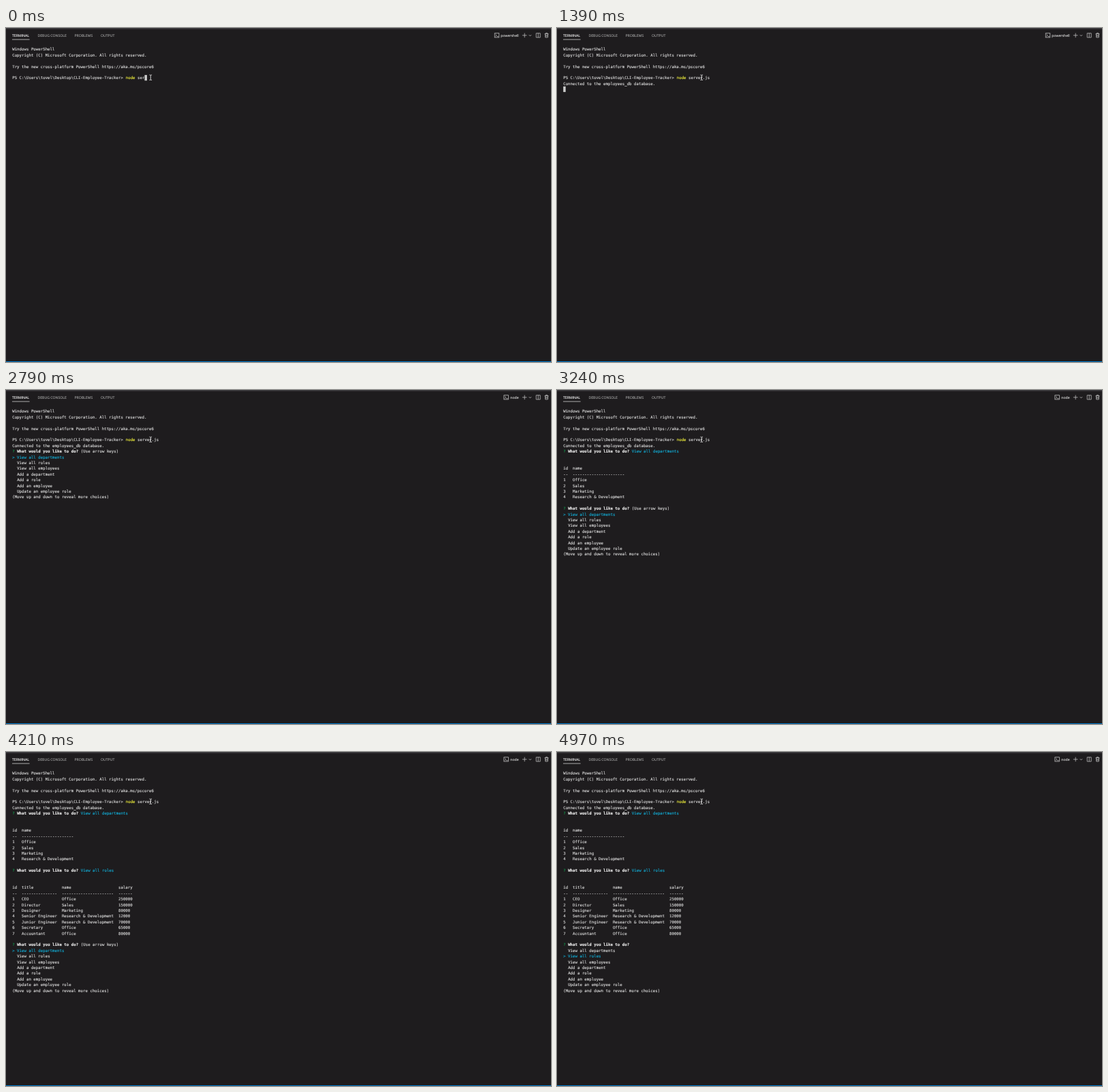
Animation of 800 by 491 pixels, one loop 5 s. Source, as an HTML page:

```html
<!DOCTYPE html>
<html lang="en">
<head>
<meta charset="utf-8">
<title>Employee tracker terminal</title>
<style>
  html, body { margin: 0; width: 100%; height: 100%; overflow: hidden; background: #1e1c1e; }
  svg { display: block; width: 100%; height: 100%; }
  text { white-space: pre; text-rendering: geometricPrecision; fill: var(--ink); stroke: var(--ink); stroke-width: .12; }
  #tabs, #shell { font: 5.2px "Open Sans", "Noto Sans", sans-serif; --ink: #a0a0a0; }
  #tabs .active { --ink: #f4f4f4; }
  #shell { --ink: #dcdcdc; }
  .icon { fill: none; stroke: #d0d0d0; stroke-width: .7; }
  #screen { font: 5.762px "DejaVu Sans Mono", "Noto Sans Mono", monospace; --ink: #dedede; }
  #screen .bold { font-weight: 700; --ink: #f2f2f2; }
  #screen .command { --ink: #f8f83c; }
  #screen .mark { --ink: #119a4c; }
  #screen .pick { --ink: #12b0da; }
</style>
</head>
<body>
<svg viewBox="0 0 800 491" preserveAspectRatio="none">
  <rect width="800" height="491" fill="#1e1c1e"/>
  <rect width="800" height="1.7" fill="#3b3a3d"/>
  <rect y="490" width="800" height="1" fill="#007acc"/>
  <g id="tabs">
    <text class="active" x="9" y="12.9">TERMINAL</text>
    <text x="46.4" y="12.9">DEBUG CONSOLE</text>
    <text x="100.4" y="12.9">PROBLEMS</text>
    <text x="138.9" y="12.9">OUTPUT</text>
    <rect x="9" y="16.6" width="25.6" height=".7" fill="#e7e7e7"/>
  </g>
  <g id="shell">
    <g id="shellIcon" class="icon">
      <rect x=".4" y="7.7" width="6.6" height="6.2"/>
      <path d="M1.7 9.2l1.8 1.6-1.8 1.6M3.9 12.5h2"/>
    </g>
    <text id="shellName" x="752.7" y="12.6" text-anchor="end"></text>
  </g>
  <path class="icon" d="M757.9 10.8h6.6M761.2 7.5v6.6M767.6 10l1.8 1.8 1.8-1.8"/>
  <path class="icon" d="M778.2 7.7h6v6.2h-6zM781.2 7.7v6.2"/>
  <path class="icon" d="M790.6 8.6h5.8M792.3 8.6v-1.2h2.4v1.2M791.4 8.6l.3 5.3h3.6l.3-5.3M792.8 9.9v2.8M794.2 9.9v2.8"/>
  <g id="screen"></g>
  <path d="M210.5 69h1.3l.5.5.5-.5h1.3M212.3 69.5v6.5M210.5 76.5h1.3l.5-.5.5.5h1.3" fill="none" stroke="#e4e4e4" stroke-width=".9"/>
</svg>
<script>
const LOOP = 5000, LEFT = 9.2, TOP = 33.3, CHAR = 3.469, LINE = 8.4;
const $ = id => document.getElementById(id);

const PROMPT = 'PS C:\\Users\\tovel\\Desktop\\CLI-Employee-Tracker>';
const QUESTION = 'What would you like to do?';
const CHOICES = ['View all departments', 'View all roles', 'View all employees',
  'Add a department', 'Add a role', 'Add an employee', 'Update an employee role'];
const DEPARTMENTS = ['Office', 'Sales', 'Marketing', 'Research & Development'];
const ROLES = [['CEO', 0, 250000], ['Director', 1, 150000], ['Designer', 2, 80000],
  ['Senior Engineer', 3, 12000], ['Junior Engineer', 3, 70000],
  ['Secretary', 0, 65000], ['Accountant', 0, 80000]];

// Moments at which each letter after "ser" is typed.
const KEYS = [90, 210, 300, 480, 620, 740];
const AT = { enter: 990, connected: 1210, menu: 1480, renamed: 2270,
  departments: 3090, down: 3650, roles: 4210, downAgain: 4820 };

const escape = s => s.replace(/&/g, '&amp;').replace(/</g, '&lt;').replace(/>/g, '&gt;');
const put = (row, col, text, style = '') =>
  `<text class="${style}" x="${LEFT + col * CHAR}" y="${TOP + row * LINE}">${escape(text)}</text>`;
const cursor = (row, col) =>
  `<rect x="${LEFT + col * CHAR}" y="${TOP + row * LINE - 6.2}" width="3.5" height="8.2" fill="#cccccc"/>`;

const ask = row => put(row, 0, '?', 'mark') + put(row, 2, QUESTION, 'bold');
const answer = (row, choice) => ask(row) + put(row, 29, CHOICES[choice], 'pick');

function menu(row, selected) {
  const items = CHOICES.map((choice, i) => i === selected
    ? put(row + 1 + i, 0, '> ' + choice, 'pick')
    : put(row + 1 + i, 2, choice));
  return ask(row) + (selected ? '' : put(row, 29, '(Use arrow keys)')) + items.join('')
    + put(row + 8, 0, '(Move up and down to reveal more choices)');
}

function table(row, heads, records) {
  const lines = [heads, ...records].map(cells => cells.map(String));
  const widths = heads.map((_, i) => Math.max(...lines.map(cells => cells[i].length)));
  lines.splice(1, 0, widths.map(width => '-'.repeat(width)));
  return lines.map((cells, i) =>
    put(row + i, 0, cells.map((cell, j) => cell.padEnd(widths[j])).join('  ').trimEnd())).join('');
}

const departmentTable = () =>
  table(10, ['id', 'name'], DEPARTMENTS.map((name, i) => [i + 1, name]));
const roleTable = () => table(20, ['id', 'title', 'name', 'salary'],
  ROLES.map(([title, dept, salary], i) => [i + 1, title, DEPARTMENTS[dept], salary]));

function screen(t) {
  const typed = 'server.js'.slice(0, 3 + KEYS.filter(key => t >= key).length);
  let out = put(0, 0, 'Windows PowerShell')
    + put(1, 0, 'Copyright (C) Microsoft Corporation. All rights reserved.')
    + put(3, 0, 'Try the new cross-platform PowerShell https://aka.ms/pscore6')
    + put(5, 0, PROMPT) + put(5, 48, 'node', 'command') + put(5, 53, typed);

  if (t < AT.enter) return out + cursor(5, 53 + typed.length);
  if (t < AT.connected) return out + cursor(6, 0);
  out += put(6, 0, 'Connected to the employees_db database.');
  if (t < AT.menu) return out + cursor(7, 0);
  if (t < AT.departments) return out + menu(7, 0);
  out += answer(7, 0) + departmentTable();
  if (t < AT.roles) return out + menu(17, t < AT.down ? 0 : 1);
  return out + answer(17, 1) + roleTable() + menu(30, t < AT.downAgain ? 0 : 1);
}

const changes = [...KEYS, ...Object.values(AT)];
let shown = -1;

function draw(now) {
  const t = now % LOOP;
  const step = changes.filter(time => t >= time).length;
  if (step !== shown) {
    shown = step;
    const renamed = t >= AT.renamed;
    $('screen').innerHTML = screen(t);
    $('shellName').textContent = renamed ? 'node' : 'powershell';
    $('shellIcon').setAttribute('transform', `translate(${renamed ? 730.5 : 716.8} 0)`);
  }
}

const start = performance.now();
function tick() {
  draw(performance.now() - start);
  requestAnimationFrame(tick);
}
tick();
</script>
</body>
</html>
```
